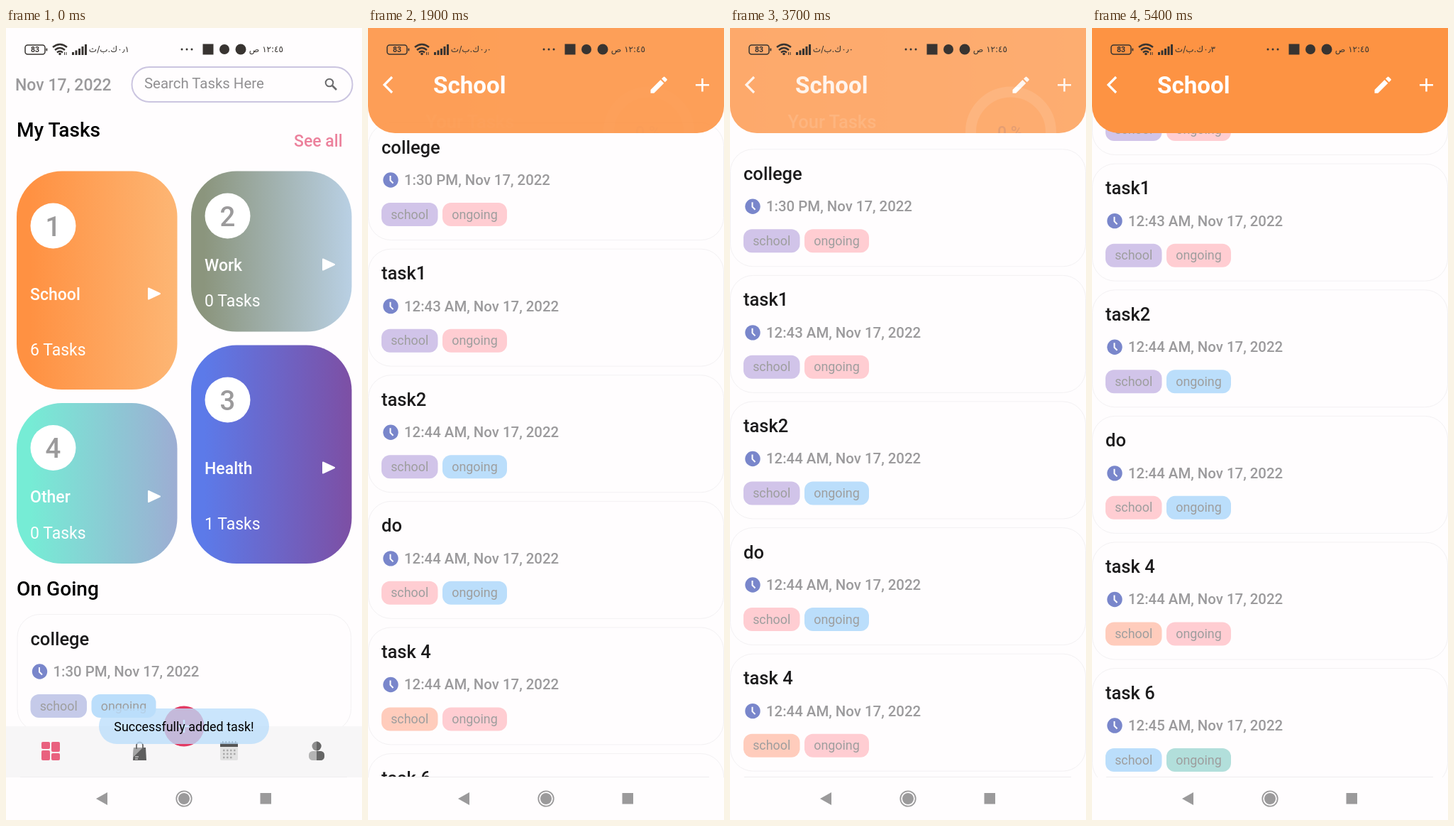
These frames come from a looping animation (502x1115 px, 5500 ms). An HTML page:

```html
<!DOCTYPE html>
<html lang="en">
<head>
<meta charset="utf-8">
<title>Task planner</title>
<style>
@property --s { syntax: '<number>'; inherits: true; initial-value: 0; }

html, body { margin: 0; width: 100%; height: 100%; overflow: hidden; background: #fffdfe; }
#stage {
  position: relative; width: 502px; height: 1115px; overflow: hidden; background: #fffdfe;
  animation: scroll 5.5s linear infinite;
}
svg, .layer { position: absolute; left: 0; top: 0; width: 502px; }
svg { height: 1115px; overflow: visible; }
.layer { height: 1055px; overflow: hidden; background: #fffdfe; }
text { font-family: Roboto, sans-serif; font-weight: 500; white-space: pre; }
.thin { font-weight: 400; }
.bold { font-weight: 700; }
.ar { font: 12px "DejaVu Sans", sans-serif; direction: rtl; }

#list { animation: open 5.5s infinite; }
#cards { transform: translateY(calc(var(--s) * -1px)); }
#head {
  position: absolute; left: 0; top: 0; width: 502px; overflow: hidden;
  height: max(148px, calc(255px - var(--s) * 1px));
  border-radius: 0 0 38px 38px;
}
#head > div { position: absolute; inset: 0; }
#summary { background: linear-gradient(90deg, #fe9143, #fcb576); opacity: calc(1 - var(--s) / 190); }
#bar { background: #fd9343; opacity: calc(var(--s) / 190); }
#glow { transform-origin: 251px 1055px; animation: glow 5.5s infinite; }
#toast { animation: toast 5.5s linear infinite; }
.net { animation: 5.5s step-end infinite; }
.net.a { animation-name: netA; }
.net.b { animation-name: netB; }
.net.c { animation-name: netC; }

@keyframes scroll {
  0%, 21.8% { --s: 0; animation-timing-function: ease-in; }
  25.45% { --s: 73.3; }
  34.5% { --s: 165; }
  41.8% { --s: 297.7; }
  52.7% { --s: 297.7; animation-timing-function: ease-in; }
  67.27% { --s: 129.3; animation-timing-function: ease-out; }
  80% { --s: 4.6; }
  81.8% { --s: 0; }
  87.2% { --s: 0; animation-timing-function: cubic-bezier(.4, 0, .5, 1); }
  98.18% { --s: 286; }
  100% { --s: 297.7; }
}
@keyframes open {
  0%, 1.9% { opacity: 0; transform: scale(.9); animation-timing-function: ease-out; }
  6.3%, 100% { opacity: 1; transform: none; }
}
@keyframes glow {
  0%, 40% { opacity: 0; transform: scaleY(0); animation-timing-function: ease-out; }
  44.5%, 47% { opacity: 1; transform: none; animation-timing-function: ease-in; }
  54.5%, 100% { opacity: 0; transform: scaleY(0); }
}
@keyframes toast { 0%, 14.5% { opacity: 1; } 18.2%, 100% { opacity: 0; } }
@keyframes netA { 0% { opacity: 1; } 18.2%, 100% { opacity: 0; } }
@keyframes netB { 0% { opacity: 0; } 18.2% { opacity: 1; } 92.7%, 100% { opacity: 0; } }
@keyframes netC { 0% { opacity: 0; } 92.7%, 100% { opacity: 1; } }
</style>
</head>
<body>
<div id="stage">
  <div class="layer" id="home">
    <svg>
      <defs id="fills"></defs>
      <text x="13" y="88" font-size="23" fill="#9a999b">Nov 17, 2022</text>
      <rect x="177.5" y="55" width="311" height="49" rx="24.5" fill="none" stroke="#cbc5e0" stroke-width="2"/>
      <text class="thin" x="195" y="85" font-size="20.4" fill="#919092">Search Tasks Here</text>
      <g fill="none" stroke="#6c6b6d" stroke-width="2">
        <circle cx="456" cy="77" r="5.3"/><path d="M460 81l6 6" stroke-width="2.6"/>
      </g>
      <text x="15" y="153" font-size="28.1">My Tasks</text>
      <text x="406" y="166.5" font-size="23" fill="#ec819c">See all</text>
      <g id="tiles"></g>
      <text x="15" y="799" font-size="28.1">On Going</text>
      <g id="recent"></g>
      <rect y="983" width="502" height="72" fill="#f7f6f7"/>
      <g fill="#e9617f">
        <rect x="50" y="1005" width="12" height="10" rx="2"/><rect x="64" y="1005" width="12" height="14" rx="2"/>
        <rect x="50" y="1017" width="12" height="14" rx="2"/><rect x="64" y="1021" width="12" height="10" rx="2"/>
      </g>
      <path d="M180 1013h17l1 18h-19z" fill="#5e5e5e"/>
      <path d="M180 1013h13l-14 14z" fill="#a5a5a5"/>
      <path d="M184 1015v-5a4.500 4.500 0 0 1 9 0v5" fill="none" stroke="#666" stroke-width="1.800"/>
      <path d="M182 1026h5M182 1029h4" stroke="#eee"/>
      <rect x="302" y="1006" width="25" height="25" rx="2" fill="#e2e2e2"/>
      <path d="M302 1006h25v6h-25z" fill="#555"/>
      <path d="M305 1006h20" stroke="#333" stroke-width="4" stroke-dasharray="1.500 3"/>
      <path d="M306 1017h18M306 1022h18M306 1027h13" stroke="#aaa" stroke-width="2.500" stroke-dasharray="2.500 2.500"/>
      <circle cx="438" cy="1011" r="6.500" fill="#8e8e8e"/>
      <rect x="427" y="1018" width="22" height="13" rx="5.500" fill="#b4b4b4"/>
      <path d="M438 1004.500a6.500 6.500 0 0 1 0 13zM438 1018h5.500a5.500 5.500 0 0 1 5.500 5.500v2a5.500 5.500 0 0 1-5.500 5.500h-5.500z" fill="#666"/>
      <circle cx="251" cy="983" r="28.5" fill="#e23a63"/>
      <path d="M251 974v18M242 983h18" stroke="#fff" stroke-width="2.500"/>
    </svg>
  </div>

  <div class="layer" id="list">
    <svg id="cards"></svg>
    <div id="head">
      <div id="summary">
        <svg fill="#fff">
          <text x="81.5" y="140.5" font-size="25.5">Your Tasks</text>
          <text x="41.500" y="171" font-size="20.4">Completed Tasks 0 / 6</text>
          <circle cx="396" cy="146.500" r="56.500" fill="none" stroke="#fff" stroke-width="15"/>
          <text x="377" y="154.500" font-size="23" fill="#1a237e">0 %</text>
        </svg>
      </div>
      <div id="bar">
        <svg fill="#fff">
          <path d="M34 69L23 80l11 11" fill="none" stroke="#fff" stroke-width="3.200"/>
          <text class="bold" x="92" y="91.500" font-size="33.200">School</text>
          <path d="M398.500 87v4.800h4.800l14-14-4.800-4.800zM414 71.500l4.800 4.800 2.600-2.600q1-1 0-2l-2.800-2.800q-1-1-2 0z"/>
          <path d="M471.500 71v18.500M462 80.200h19" stroke="#fff" stroke-width="2.600"/>
        </svg>
      </div>
    </div>
    <svg id="glow"><circle cx="258" cy="1948" r="971" fill="#2196f3" fill-opacity=".24"/></svg>
  </div>

  <svg id="toast">
    <rect x="131" y="958" width="240" height="50" rx="25" fill="#bbdefb" fill-opacity=".78"/>
    <text class="thin" x="251" y="990" font-size="17.900" text-anchor="middle">Successfully added task!</text>
  </svg>

  <svg id="system">
    <rect y="1055" width="502" height="60" fill="#fffdfe"/>
    <path d="M20 1054.500h461" stroke="#efedef"/>
    <g fill="#9b9a9b">
      <path d="M127 1085l16-9v18z"/>
      <circle cx="251" cy="1085" r="8"/>
      <circle cx="251" cy="1085" r="10.700" fill="none" stroke="#9b9a9b" stroke-width="1.800"/>
      <rect x="358.500" y="1077" width="15.500" height="15.500"/>
    </g>
    <g fill="#383431">
      <rect x="27" y="24" width="28" height="13" rx="3.500" fill="none" stroke="#383431" stroke-width="1.500"/>
      <rect x="56.500" y="28.500" width="1.800" height="4" rx=".8"/>
      <text class="bold" x="41" y="34.300" font-size="10.500" text-anchor="middle">83</text>
      <g fill="none" stroke="#383431" stroke-width="2.500">
        <path d="M66 27q10-8 20 0M69 31q7-6 14 0M72 34.500q4-3.500 8 0"/>
      </g>
      <circle cx="76" cy="36.500" r="1.800"/>
      <path d="M82.500 38v-4M85 34v4" stroke="#383431"/>
      <path d="M94.500 38v-4M99 38v-6.500M103.500 38v-9M108 38v-12M112.500 38v-15" stroke="#383431" stroke-width="3"/>
      <text class="ar net a" x="174" y="34">٠٫١ك.ب/ث</text>
      <text class="ar net b" x="174" y="34">٠٫٠ك.ب/ث</text>
      <text class="ar net c" x="174" y="34">٠٫٣ك.ب/ث</text>
      <circle cx="248" cy="30" r="1.500"/><circle cx="255" cy="30" r="1.500"/><circle cx="262" cy="30" r="1.500"/>
      <rect x="277.500" y="22.500" width="15" height="15"/>
      <circle cx="308" cy="30" r="7"/>
      <circle cx="331" cy="30" r="7.500"/>
      <text class="ar" x="391" y="34">١٢:٤٥ ص</text>
    </g>
  </svg>
</div>

<script>
const $ = id => document.getElementById(id);
const violet = '#d1c4e9', red = '#ffcdd2', blue = '#bbdefb', peach = '#ffccbc', teal = '#b2dfdb', indigo = '#c5cae9';

const chip = (x, w, label, fill) => `
  <rect x="${x}" y="113" width="${w}" height="33" rx="12" fill="${fill}"/>
  <text class="thin" x="${x + w / 2}" y="135.500" font-size="17.900" fill="#9e9e9e" text-anchor="middle">${label}</text>`;

const card = (x, y, width, name, time, school, ongoing) => `
  <g transform="translate(${x} ${y})">
    <rect x=".5" y=".5" width="${width - 1}" height="165" rx="32" fill="#fffdfe" stroke="#f3f1f3"/>
    <text x="19" y="43.500" font-size="25.5" fill="#1c1b1c">${name}</text>
    <circle cx="32" cy="81" r="10.700" fill="#7986cb"/>
    <path d="M31.500 75v6.500l4 4" fill="none" stroke="#fff" stroke-width="2"/>
    <text x="51" y="88" font-size="20.4" fill="#9b9a9c">${time}, Nov 17, 2022</text>
    ${chip(19, 79.5, 'school', school)}${chip(105, 91, 'ongoing', ongoing)}
  </g>`;

const tile = ([x, y, h, name, count, from, to], i) => {
  const tall = h > 250;
  const cy = y + (tall ? 77 : 63), nameY = y + (tall ? 181 : 140), countY = y + (tall ? 259 : 190.5);
  $('fills').innerHTML += `<linearGradient id="fill${i}">
    <stop offset=".08" stop-color="${from}"/><stop offset="1" stop-color="${to}"/></linearGradient>`;
  return `
    <rect x="${x}" y="${y}" width="226.500" height="${h}" rx="64" fill="url(#fill${i})"/>
    <circle cx="${x + 51.5}" cy="${cy}" r="32" fill="#fff"/>
    <text x="${x + 51.5}" y="${cy + 14}" font-size="38.300" fill="#9b9a9b" text-anchor="middle">${i + 1}</text>
    <g fill="#fff" font-size="23">
      <text x="${x + 19}" y="${nameY}">${name}</text>
      <text class="thin" x="${x + 19}" y="${countY}">${count} Tasks</text>
      <path d="M${x + 186} ${nameY - 16}l16 7.500-16 7.500z" stroke="#fff" stroke-width="2" stroke-linejoin="round"/>
    </g>`;
};

$('tiles').innerHTML = [
  [15, 201.5, 307.5, 'School', 6, '#ff9142', '#fdb674'],
  [261, 201.5, 226, 'Work', 0, '#8b957d', '#b9d0e4'],
  [261, 446.5, 307.5, 'Health', 1, '#5c7ae9', '#7d4fa4'],
  [15, 528, 226, 'Other', 0, '#76ecd5', '#9dadd3'],
].map(tile).join('');

$('recent').innerHTML = card(15.5, 825, 471.5, 'college', '1:30 PM', indigo, blue);

$('cards').innerHTML = [
  ['college', '1:30 PM', violet, red],
  ['task1', '12:43 AM', violet, red],
  ['task2', '12:44 AM', violet, blue],
  ['do', '12:44 AM', red, blue],
  ['task 4', '12:44 AM', peach, red],
  ['task 6', '12:45 AM', blue, teal],
].map((task, i) => card(0, 299.2 + i * 177.6, 502, ...task)).join('');
</script>
</body>
</html>
```
